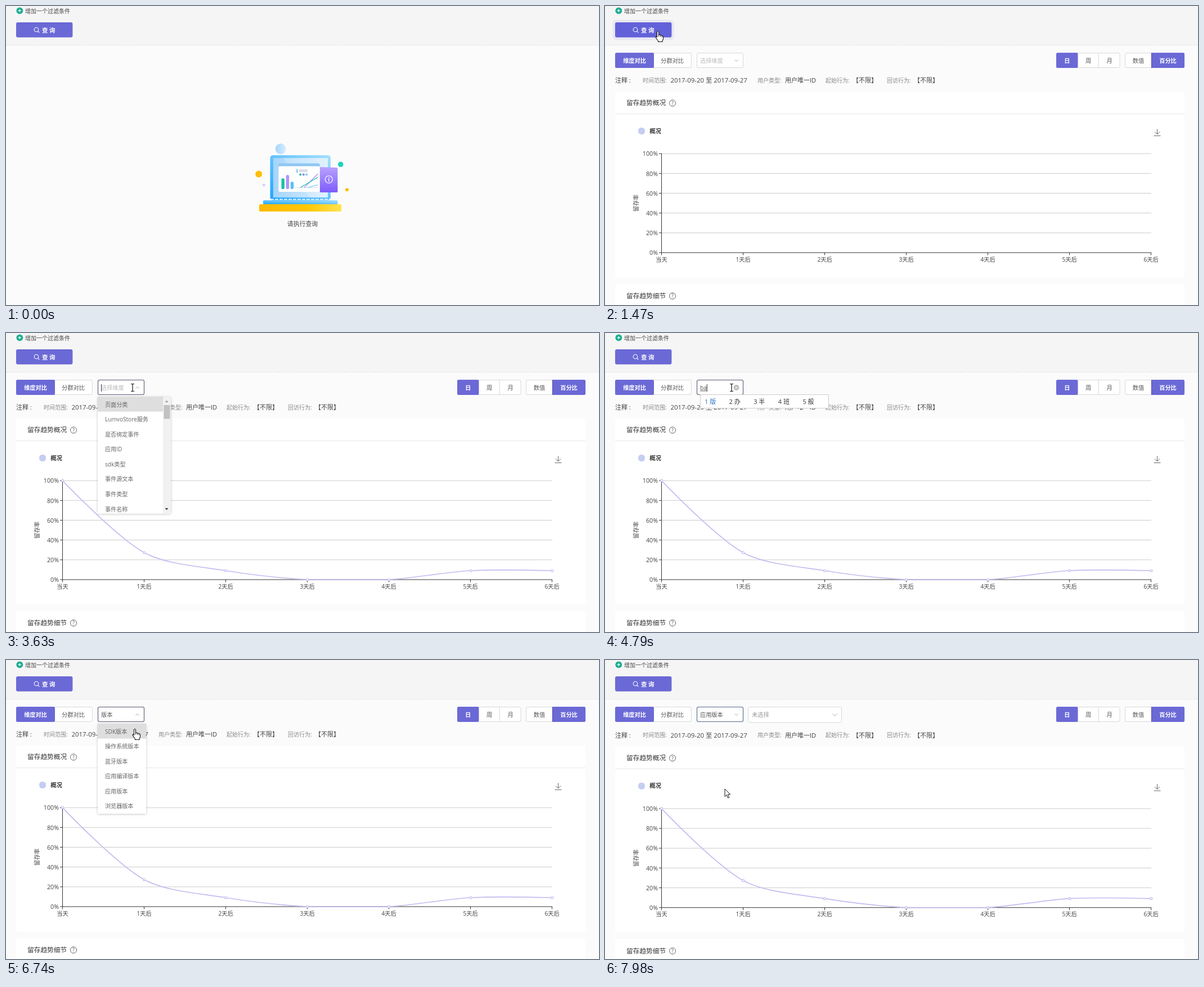
Recreate the animation shown at these times as an HTML page. Size 1054 by 531 pixels, loop 8 s.

```html
<!DOCTYPE html>
<html lang="zh">
<head>
<meta charset="utf-8">
<style>
html, body { margin: 0; width: 100%; height: 100%; overflow: hidden; background: #fbfbfb }
svg { display: block; width: 100vw; height: 100vh; font-family: 'Open Sans', 'Noto Sans CJK SC', 'Noto Sans CJK', sans-serif }
text { white-space: pre }
</style>
</head>
<body>
<svg id="stage" viewBox="0 0 1054 531">
<defs>
<linearGradient id="sky" x1="0" y1="1" x2="1" y2="0"><stop stop-color="#1fa6fd"/><stop offset="1" stop-color="#a6e0fd"/></linearGradient>
<linearGradient id="pale"><stop stop-color="#a5d4fa"/><stop offset="1" stop-color="#d9eefd"/></linearGradient>
<linearGradient id="gold"><stop stop-color="#ffb900"/><stop offset=".6" stop-color="#ffc808"/><stop offset="1" stop-color="#ffe24e"/></linearGradient>
<linearGradient id="violet" x2="0" y2="1"><stop stop-color="#b7a2fe"/><stop offset="1" stop-color="#7c5cfb"/></linearGradient>
<filter id="shadow" x="-10%" y="-10%" width="120%" height="120%"><feDropShadow dx="0" dy="1" stdDeviation="2" flood-opacity=".22"/></filter>
</defs>
<g id="view"></g>
</svg>
<script>
const LOOP = 8000, MAIN = '#6b69d6', LINE = '#c0bdf0';
const clamp = v => Math.max(0, Math.min(1, v));

const rect = (x, y, w, h, fill, more = '') => `<rect x="${x}" y="${y}" width="${w}" height="${h}" fill="${fill}" ${more}/>`;
const disc = (x, y, r, fill, more = '') => `<circle cx="${x}" cy="${y}" r="${r}" fill="${fill}" ${more}/>`;
const path = (d, stroke, width = 1, fill = 'none', more = '') =>
  `<path d="${d}" stroke="${stroke}" stroke-width="${width}" fill="${fill}" ${more}/>`;
// y is the vertical middle of the glyphs
const text = (x, y, s, size = 10.2, fill = '#555', more = '') =>
  `<text x="${x}" y="${y + size * .37}" font-size="${size}" fill="${fill}" ${more}>${s}</text>`;
const MID = 'text-anchor="middle"', BOLD = 'font-weight="600"';
const at = (x, y, s) => `<g transform="translate(${x} ${y})">${s}</g>`;
const box = (x, y, w, h, border = '#d9d9d9', width = 1) =>
  rect(x + .5, y + .5, w - 1, h - 1, '#fff', `rx="2.5" stroke="${border}" stroke-width="${width}"`);
const chevron = (x, y, up, r = 3) => path(`M${x - r} ${y + (up ? 1.5 : -1.5)}l${r} ${up ? -r : r}l${r} ${up ? r : -r}`, '#aaa');

// pointer: time, x, y, shape
const moves = [
  [150, 464, 441, 'arrow'], [230, 272, 393, 'arrow'], [380, 182, 237, 'arrow'], [460, 128, 130, 'arrow'],
  [540, 102, 86, 'arrow'], [690, 101, 62, 'arrow'], [770, 96, 48, 'hand'], [840, 94, 44, 'hand'],
  [2860, 94, 46, 'hand'], [2940, 126, 62, 'arrow'], [3010, 180, 94, 'arrow'], [3090, 213, 113, 'arrow'],
  [3250, 222, 103, 'beam'], [3320, 225, 97, 'beam'], [6120, 225, 96, 'beam'], [6270, 226, 96, 'beam'],
  [6500, 226, 97, 'beam'], [6670, 229, 122, 'hand'], [6750, 229, 138, 'hand'], [6820, 229, 155, 'hand'],
  [6970, 227, 172, 'hand'], [7050, 221, 196, 'hand'], [7140, 215, 222, 'hand'], [7290, 212, 229, 'hand'],
  [7370, 211, 231, 'hand'], [7980, 213, 229, 'arrow']
];
const shapes = {
  arrow: path('M0 0V13.5L3.2 10.6L5.4 16L7.7 15L5.4 9.8H9.8Z', '#111', 1, '#fff'),
  hand: path('M-1.5 1.8Q0-.8 1.5 1.8V7.5Q3.5 6.3 4.5 8Q6.5 7.2 7.3 9Q9.5 8.6 9.5 11V14Q9.5 16 8 17.5V19.5H.5V18Q-2 15-4 11.5Q-4 9-1.5 11Z', '#111', 1.1, '#fff')
    + path('M1.5 7V10.5M4.5 8V11M7.2 9V11.5', '#111', .9),
  beam: path('M-3-6.5H3M0-6.5V6.5M-3 6.5H3', '#111', 1.2)
};
const last = (list, t) => list.filter(e => e[0] <= t).pop();

function pointer(t) {
  const p = last(moves, t);
  return p ? at(p[1], p[2], shapes[p[3]]) : '';
}

function header(t) {
  const hover = t >= 770 && t < 2940;
  const wave = clamp((t - 1150) / 350), fade = 1 - clamp((t - 1300) / 950);
  const s = wave * 5;
  return rect(0, 0, 1054, 69, '#f5f5f5') + path('M0 69.5H1054', '#dedede', 1, 'none', 'stroke-dasharray="3 2"')
    + disc(24.3, 8.3, 5.9, '#1cab90') + path('M21.5 8.3h5.6M24.3 5.5v5.6', '#fff', 1.2)
    + text(34, 9, '增加一个过滤条件', 10, '#444')
    + (wave && fade ? rect(18 - s, 29 - s, 100 + 2 * s, 27 + 2 * s, MAIN, `rx="${3 + s}" opacity="${.12 * fade}"`) : '')
    + rect(18, 29, 100.4, 26.7, hover ? '#6361d9' : MAIN, 'rx="3"')
    + disc(54, 42, 3.8, 'none', 'stroke="#fff" stroke-width="1.1"') + path('M56.7 44.7l2.6 2.6', '#fff', 1.2)
    + text(64, 43, '查 询', 10.4, '#fff', BOLD);
}

function laptop() {
  const bar = (x, y, h, c) => rect(x, y, 5.5, h, c, 'rx="2.6"');
  return disc(488.3, 253.7, 9.5, 'url(#pale)') + disc(449.2, 298.5, 6, '#fdbf0a') + disc(594.8, 281.3, 4.8, '#1fd1c0')
    + disc(606, 326.3, 3, '#fdbf0a') + disc(458.3, 318, 1.8, '#eceaff', 'stroke="#b9b2fb"')
    + rect(469.5, 265, 107.5, 80, 'url(#sky)', 'rx="5"') + rect(475, 270, 97, 70, 'url(#pale)')
    + path('M493 270H572V340H540Z', 'none', 0, '#fff', 'opacity=".2"')
    + rect(457, 345, 132.5, 7.5, 'url(#sky)', 'rx="2"')
    + path('M470 343.5H579', '#e9f7ff', 2, 'none', 'stroke-dasharray="6 2"')
    + rect(450, 352, 146, 13, 'url(#gold)', 'rx="2.5"')
    + rect(484.5, 279.5, 73, 8, '#8fc6f2', 'rx="2"') + rect(484.5, 284.5, 73, 45.5, '#fff', 'rx="2"')
    + bar(489.5, 306, 19, '#1dc0a8') + bar(497.7, 300, 25, '#b094fb') + bar(505.8, 312, 13, '#5cc0f8')
    + rect(516.7, 290, 1.4, 6, '#3a9df0') + rect(521, 290, 15, 5, '#d9dee7')
    + rect(521.5, 297.5, 3.6, 3.6, '#1dc0a8') + rect(527, 297.5, 3.6, 3.6, '#9a80f5') + rect(532.3, 297.5, 3.6, 3.6, '#7fcdf9')
    + path('M514 322.5H555', '#d8dde6') + path('M536 322.5L554.5 317.5', '#8fd0fa', 1.3)
    + path('M530 322.5L554.5 298', '#a38cf8', 1.3) + path('M523 322.5L554.5 304', '#1dc0a8', 1.4)
    + path('M558 287.5Q558 286 559.5 286L588 287Q589.5 287 589.5 288.5V329.5Q589.5 331 588 331H559.5Q558 331 558 329.5Z', 'none', 0, 'url(#violet)')
    + disc(573.8, 308, 6.5, 'none', 'stroke="#fff" stroke-width="1.2"')
    + path('M573.8 306.5V312M573.8 304V305.4', '#fff', 1.3)
    + text(527, 387, '请执行查询', 10.9, '#444', MID);
}

function tabs() {
  const pick = (x, w, s) => rect(x, 83, w, 27, MAIN, 'rx="2.5"') + text(x + w / 2, 97, s, 10.2, '#fff', MID + ' ' + BOLD);
  return box(18, 83, 136, 27) + pick(18, 69, '维度对比') + text(99.3, 97, '分群对比')
    + box(802, 83, 113.5, 27) + pick(802, 38.5, '日') + path('M877.5 83V110', '#d9d9d9')
    + text(859, 97, '周', 10.2, '#555', MID) + text(896.5, 97, '月', 10.2, '#555', MID)
    + box(924, 83, 106, 27) + pick(971, 59, '百分比') + path('M971.5 83V110', '#4b4998')
    + text(948, 97, '数值', 10.2, '#555', MID);
}

function notes() {
  const label = (x, s) => text(x, 132, s, 10, '#888'), value = (x, s, size = 11) => text(x, 132, s, size, '#444');
  return value(18, '注释 :') + label(67, '时间范围:') + value(116.5, '2017-09-20 至 2017-09-27', 11.4)
    + label(271, '用户类型:') + value(320, '用户唯一ID') + label(392, '起始行为:') + value(440, '【不限】')
    + label(501, '回访行为:') + value(549, '【不限】');
}

const cardTitle = (y, s) => text(38, y, s, 11.7, '#333')
  + disc(120, y + .5, 5.6, 'none', 'stroke="#555" stroke-width=".9"') + text(120, y + .5, '?', 9, '#555', MID);

const BASE = 438, ROW = 35.16;
const points = [100, 27.3, 9.1, 0, 0, 9.1, 9.1].map((v, i) => [100.5 + 145.05 * i, BASE - ROW * v / 20]);

// Smooth curve: handles follow the chord between neighbours, shared by distance, never below the axis
const curve = (() => {
  const dist = (a, b) => Math.hypot(a[0] - b[0], a[1] - b[1]);
  const handles = points.map((p, i) => {
    const a = points[i - 1], b = points[i + 1];
    if (!a || !b) return [p, p];
    const k = dist(a, p) / (dist(a, p) + dist(p, b));
    const move = f => [p[0] + (b[0] - a[0]) * f, Math.min(BASE, p[1] + (b[1] - a[1]) * f)];
    return [move(-.3 * k), move(.3 * (1 - k))];
  });
  return 'M' + points[0] + points.slice(1).map((p, i) => `C${handles[i][1]} ${handles[i + 1][0]} ${p}`).join('');
})();

function chart(t) {
  let s = rect(18, 152, 1012, 330, '#fff') + path('M18 191.5H1030', '#e8e8e8') + cardTitle(172, '留存趋势概况')
    + rect(59, 216, 12, 12, '#c5cdf2', 'rx="5.2"') + text(79.3, 222, '概况', 10.3, '#333', BOLD)
    + path('M975.5 230.5H987.5M981.5 218.5V228M977 223.5l4.5 4.5l4.5-4.5', '#666')
    + text(55, 350, '留存率', 10.2, '#444', MID + ' transform="rotate(-90 55 350)"');
  for (let i = 0; i < 6; i++) {
    const y = BASE - ROW * i;
    if (i) s += path(`M101 ${y}H971`, '#ccc');
    s += path(`M96 ${y}H101`, '#333') + text(94, y + .3, i * 20 + '%', 10.7, '#444', 'text-anchor="end"');
  }
  s += path(`M100.5 262V${BASE}H971`, '#333');
  points.forEach(([x], i) => {
    x = Math.floor(x) + .5;
    s += path(`M${x} ${BASE}V442.5`, '#333') + text(x, 450, i ? i + '天后' : '当天', 10.2, '#444', MID);
  });
  const shown = clamp((t - 1500) / 950), dot = clamp((t - 2250) / 200);
  s += `<svg x="0" y="0" width="${98 + 878 * shown}" height="531">${path(curve, LINE, 1.7)}</svg>`;
  if (dot) for (const [x, y] of points) s += disc(x, y, 2 * dot, '#fff', `stroke="${LINE}" stroke-width="1.2"`);
  return s + rect(18, 494, 1012, 40, '#fff') + cardTitle(514.5, '留存趋势细节');
}

const allItems = ['页面分类', 'LumvoStore服务', '是否绑定事件', '应用ID', 'sdk类型', '事件源文本', '事件类型', '事件名称'];
const found = ['SDK版本', '操作系统版本', '蓝牙版本', '应用编译版本', '应用版本', '浏览器版本'];
const typed = [[0, ''], [4560, 'b'], [4790, 'ba'], [4870, 'ban'], [5420, 'banb'], [5510, 'banbe'], [5660, 'banben'], [5740, '版本'], [7600, '应用版本']];
const rows = [[0, 0], [6970, 1], [7050, 2], [7140, 3], [7290, 4]];

function menu(items, width, height, active, scroll, opacity) {
  let s = rect(163, 113, width, height, '#fff', 'rx="2" filter="url(#shadow)"')
    + rect(163, 113 + 26.6 * active, scroll ? 116 : width, 26.6, '#dedede');
  items.forEach((name, i) => s += text(176, 127 + 26.55 * i, name, 10.1, '#666'));
  if (scroll) s += rect(279, 113, 14, 207, '#f1f1f1') + rect(280.5, 128, 11, 24.5, '#c1c1c1')
    + path('M282.5 123l3-3.5l3 3.5Z', 'none', 0, '#a0a0a0') + path('M282.5 311l3 3.5l3-3.5Z', 'none', 0, '#444');
  return `<g opacity="${opacity}">${s}</g>`;
}

function dropdown(t) {
  if (t >= 3550 && t < 4650) return menu(allItems, 130, 207.5, 0, true, t < 3630 ? .6 : 1);
  if (t >= 5740 && t < 7830) return menu(found, 86, 160, last(rows, t)[1], false, 1 - clamp((t - 7560) / 270));
  return '';
}

function candidates(word) {
  const right = [392, 398, 405, 430, 452, 492][word.length - 1], step = (right - 180) / 5;
  const list = word.length < 2 ? '不 把 吧 被 别' : word.length < 4 ? '版 办 半 班 般' : '版本 版 办 半 班';
  return rect(169.5, 109.5, right - 170, 24, '#fff', 'stroke="#ccc"')
    + list.split(' ').map((c, i) => text(177 + i * step, 122, `${i + 1} ${c}`, 11, i ? '#333' : '#2a6fc9')).join('');
}

function picker(t) {
  const focus = t >= 3550, open = focus && t < 7600, done = t >= 7600;
  const border = done ? '#56698c' : focus ? '#5d5974' : t >= 3250 ? '#8f8de0' : '#d9d9d9';
  const word = last(typed, t)[1], latin = /^[a-z]/.test(word);
  const caretX = 169.5 + (latin ? word.length * 5.9 : word.length * 10.2);
  const caret = open && (t < 4010 || t >= 4560 && t < 6270 || t >= 6820 && t < 7370);
  let s = box(163, 83, 83, 27, border, focus ? 1.1 : 1)
    + text(169, 97.5, word || '选择维度', 10.2, word ? '#555' : '#bbb', latin ? 'text-decoration="underline"' : '');
  if (caret) s += path(`M${caretX} 91V104`, '#333');
  if (word && t < 6670) s += disc(233.5, 97, 5, '#bdbdbd') + path('M231.6 95.1l3.8 3.8m0-3.8l-3.8 3.8', '#fff');
  else s += chevron(233.5, 97, open);
  if (t >= 7680) s += box(254, 83, 167, 28.5) + text(261, 97.5, '未选择', 10.3, '#999') + chevron(408.5, 97, false, 4);
  return s + dropdown(t) + (latin ? candidates(word) : '');
}

const view = document.getElementById('view');
let before = '';
function draw(now) {
  const t = now % LOOP;
  const body = t < 1470 ? laptop() : tabs() + at(0, t >= 7680 ? 1.7 : 0, notes() + chart(t)) + picker(t);
  const next = header(t) + body + pointer(t);
  if (next !== before) view.innerHTML = before = next;
}
const start = performance.now();
function tick() {
  draw(performance.now() - start);
  requestAnimationFrame(tick);
}
tick();
</script>
</body>
</html>
```
